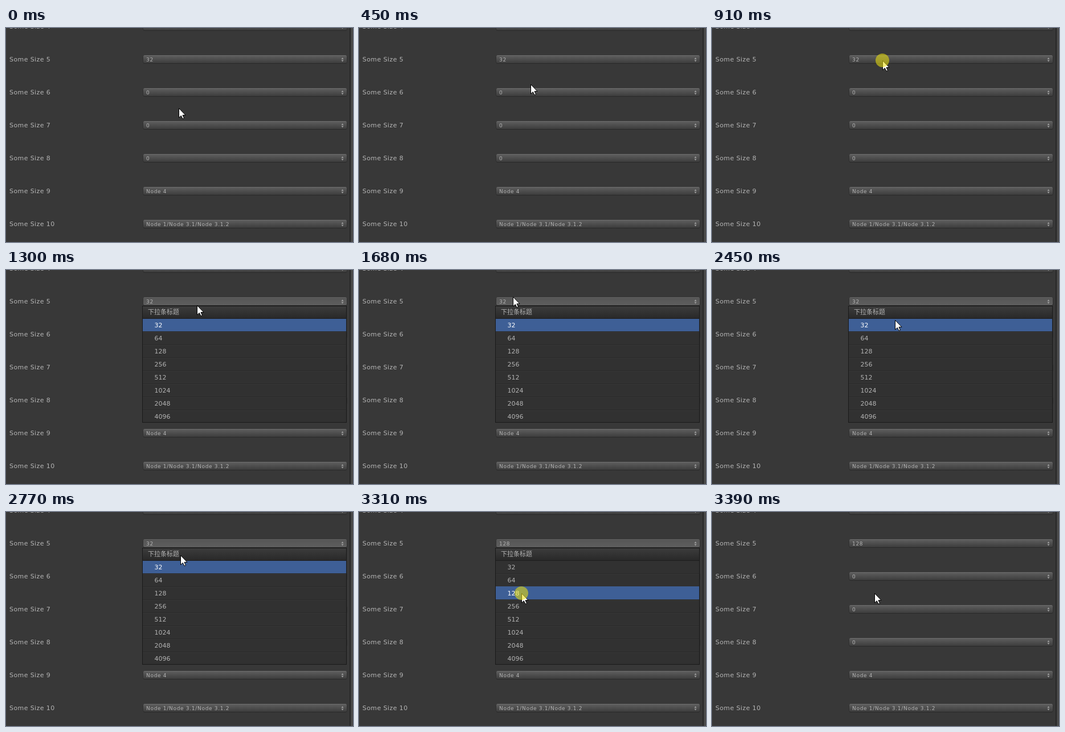
An HTML page for the animation above (4.09 s loop, 609 by 377 pixels).

```html
<!DOCTYPE html>
<html lang="en">
<head>
<meta charset="utf-8">
<title>Dropdown demo</title>
<style>
  html, body { margin: 0; width: 100%; height: 100%; overflow: hidden; background: #383838; }
  svg { display: block; width: 100%; height: 100%; }
  text { font: 11px "DejaVu Sans", sans-serif; fill: #b4b4b4; white-space: pre; }
  .label { letter-spacing: .4px; }
  .value { font-size: 9px; letter-spacing: .7px; }
  .title { font-family: "Noto Sans CJK SC", "Noto Sans CJK", sans-serif; }
  .active { fill: #fff; }
</style>
</head>
<body>
<svg viewBox="0 0 609 377">
  <defs>
    <linearGradient id="field" x2="0" y2="1">
      <stop stop-color="#757575"/><stop offset=".1" stop-color="#5c5c5c"/><stop offset="1" stop-color="#3d3d3d"/>
    </linearGradient>
    <linearGradient id="fieldOpen" x2="0" y2="1">
      <stop stop-color="#6c6c6c"/><stop offset=".1" stop-color="#565656"/><stop offset="1" stop-color="#5e5e5e"/>
    </linearGradient>
    <linearGradient id="header" x2="0" y2="1">
      <stop stop-color="#3c3c3c"/><stop offset="1" stop-color="#292929"/>
    </linearGradient>
  </defs>
  <rect width="609" height="377" fill="#383838"/>
  <rect x="603" width="2" height="377" fill="#272727"/>
  <rect x="605" width="4" height="377" fill="#484848"/>
  <g id="rows"></g>
  <g id="menu"></g>
  <g id="pointer">
    <path d="M.5 .5V17L4.3 13.5L7 19L9.5 18L7 12.5H12Z" fill="#fff" stroke="#000"/>
    <circle id="click" r="12" fill="#eae010" fill-opacity=".57"/>
  </g>
</svg>
<script>
const LOOP = 4090, STEP = 1000 / 13;
const PRESS = 910, OPEN = 990, PICK = 3310, CLOSE = 3390;
const START = [303, 141], FIELD = [299, 57], TURN = [306, 76], LEAVE = [306, 109], CHOICE = [285, 143];
const sizes = Array.from({ length: 8 }, (_, i) => 32 * 2 ** i);
const values = ["", "32", "0", "0", "0", "Node 4", "Node 1/Node 3.1/Node 3.1.2"];

const $ = id => document.getElementById(id);

function add(parent, tag, attrs, content = "") {
  const el = document.createElementNS("http://www.w3.org/2000/svg", tag);
  for (const name in attrs) el.setAttribute(name, attrs[name]);
  el.textContent = content;
  return parent.appendChild(el);
}

const menuRect = (y, height, fill) => add($("menu"), "rect", { x: 240, y, width: 357, height, fill });

function addRow(value, i) {
  const row = add($("rows"), "g", { transform: `translate(0 ${i * 58 - 10})` });
  add(row, "text", { x: 6, y: 11, class: "label" }, `Some Size ${i + 4}`);
  add(row, "rect", { x: 240.5, y: 1, width: 358, height: 14, rx: 3, fill: "#292929" });
  const box = add(row, "rect", { x: 241, y: 0, width: 357, height: 14, rx: 2.5, fill: "url(#field)" });
  const text = add(row, "text", { x: 246, y: 11, class: "value" }, value);
  add(row, "path", { d: "M588.5 7L590.5 4L592.5 7ZM588.5 8.5L590.5 11.5L592.5 8.5Z", fill: "#a0a0a0" });
  return { box, text };
}

function addItem(size, i) {
  const y = 85 + i * 23;
  if (i) {
    menuRect(y, 1, "#292929");
    menuRect(y + 1, 1, "#373737");
  }
  const bar = menuRect(i ? y : y + 1, i ? 23 : 22, "#3e5f96");
  const text = add($("menu"), "text", { x: 260.5, y: y + 16 }, size);
  return { bar, text };
}

const sizeField = values.map(addRow)[1];
add($("menu"), "rect", { x: 239, y: 63, width: 359, height: 206, fill: "#191919" });
menuRect(64, 204, "#313131");
menuRect(64, 21, "url(#header)");
menuRect(85, 1, "#1d1d1d");
add($("menu"), "text", { x: 249, y: 78, class: "title" }, "下拉条标题");
const items = sizes.map(addItem);

function glide(from, to, progress) {
  const p = Math.min(1, Math.max(0, progress));
  const eased = p * p * (3 - 2 * p);
  return from.map((v, i) => v + (to[i] - v) * eased);
}

// Clockwise loops around the menu title, widening towards the end.
function circleTitle(step) {
  const angle = (153 + (step - 27) * 52.6) * Math.PI / 180;
  const widen = 1 + Math.max(0, step - 27) * .05;
  return [287 + 49 * widen * Math.cos(angle), 66.6 + 20.8 * widen * Math.sin(angle)];
}

// The pointer is sampled 13 times a second.
function pointerAt(t) {
  const step = Math.floor((t + 15) / STEP);
  if (step < 17) return glide(START, FIELD, (step - 3) / 6);
  if (step < 36) return circleTitle(step);
  if (step < 37) return TURN;
  return glide(LEAVE, CHOICE, (step - 37) / 3);
}

function show(el, visible) {
  el.setAttribute("visibility", visible ? "visible" : "hidden");
}

function render(t) {
  const open = t >= OPEN && t < CLOSE;
  const selected = t < PICK ? 0 : 2;
  const [x, y] = pointerAt(t).map(Math.round);

  sizeField.text.textContent = sizes[selected];
  sizeField.box.setAttribute("fill", open ? "url(#fieldOpen)" : "url(#field)");
  show($("menu"), open);
  items.forEach(({ bar, text }, i) => {
    show(bar, open && i === selected);
    text.setAttribute("class", i === selected ? "active" : "");
  });
  $("pointer").setAttribute("transform", `translate(${x} ${y})`);
  show($("click"), (t >= PRESS && t < OPEN) || (t >= PICK && t < CLOSE));
}

const start = performance.now();
function tick() {
  render((performance.now() - start) % LOOP);
  requestAnimationFrame(tick);
}
tick();
</script>
</body>
</html>
```
